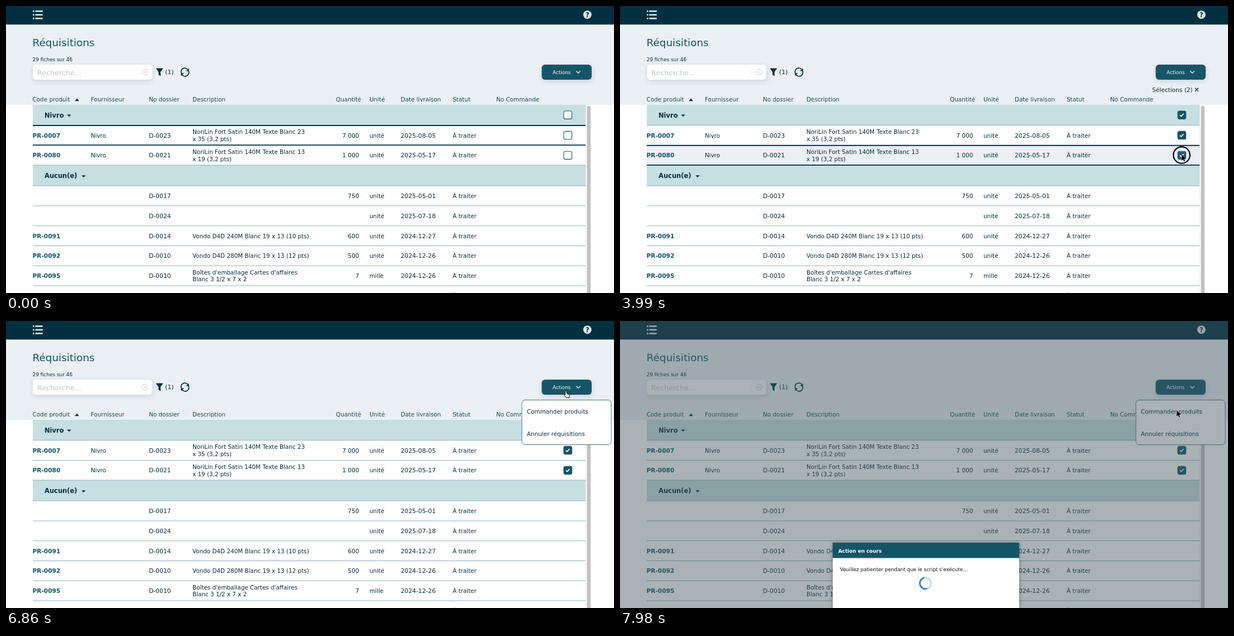
Animation of 1089x514 px, one loop 8000 ms. Source, as an HTML page:

```html
<!DOCTYPE html>
<html lang="fr">
<head>
<meta charset="utf-8">
<title>Réquisitions</title>
<style>
  html, body { margin: 0; width: 100%; height: 100%; overflow: hidden; background: #fff; }
  svg { display: block; width: 100vw; height: 100vh; font-family: "DejaVu Sans", sans-serif; }
  text { white-space: pre; }
</style>
</head>
<body>
<svg id="stage" viewBox="0 0 1089 514"></svg>
<script>
const LOOP = 8000, STEP = 70;
const DARK = '#00303f', TEAL = '#135567', PALE = '#ebf0f5', GROUP = '#c6dfe3', LINE = '#8fb2ba', INK = '#0b2d39';

const rect = (x, y, w, h, fill, extra = '') =>
  `<rect x="${x}" y="${y}" width="${w}" height="${h}" fill="${fill}" ${extra}/>`;
const path = (d, stroke, width = 1, extra = '') =>
  `<path d="${d}" fill="none" stroke="${stroke}" stroke-width="${width}" ${extra}/>`;
const shape = (d, fill = DARK) => `<path d="${d}" fill="${fill}"/>`;
const text = (x, y, s, size = 10.4, fill = INK, extra = '') =>
  `<text x="${x}" y="${y}" font-size="${size}" fill="${fill}" ${extra}>${s}</text>`;
const BOLD = 'font-weight="bold"';

// centre y, code, supplier, file, description lines, quantity, unit, date
const rows = [
  [231.7, 'PR-0007', 'Nivro', 'D-0023', ['NoriLin Fort Satin 140M Texte Blanc 23', 'x 35 (3,2 pts)'], '7 000', 'unité', '2025-08-05'],
  [267.5, 'PR-0080', 'Nivro', 'D-0021', ['NoriLin Fort Satin 140M Texte Blanc 13', 'x 19 (3,2 pts)'], '1 000', 'unité', '2025-05-17'],
  [340.3, '', '', 'D-0017', [], '750', 'unité', '2025-05-01'],
  [376, '', '', 'D-0024', [], '', 'unité', '2025-07-18'],
  [411.8, 'PR-0091', '', 'D-0014', ['Vondo D4D 240M Blanc 19 x 13 (10 pts)'], '600', 'unité', '2024-12-27'],
  [447.5, 'PR-0092', '', 'D-0010', ['Vondo D4D 280M Blanc 19 x 13 (12 pts)'], '500', 'unité', '2024-12-26'],
  [483.2, 'PR-0095', '', 'D-0010', ["Boîtes d'emballage Cartes d'affaires", 'Blanc 3 1/2 x 7 x 2'], '7', 'mille', '2024-12-26'],
  [519, '', '', '', [], '', '', '']
];

function rowText([cy, code, supplier, file, lines, qty, unit, date]) {
  const y = cy + 3.9;
  return text(47.5, y, code, 10.6, TEAL, BOLD) + text(152, y, supplier) + text(256, y, file, 10.7) +
    lines.map((s, i) => text(334, y + (i - (lines.length - 1) / 2) * 12.7, s)).join('') +
    text(632.5, y, qty, 10.6, INK, 'text-anchor="end"') + text(651, y, unit) +
    text(707, y, date, 10.8) + text(800, y, 'À traiter');
}

const columns = [[47.5, 'Code produit'], [152, 'Fournisseur'], [256, 'No dossier'], [334, 'Description'],
  [591, 'Quantité'], [651, 'Unité'], [707, 'Date livraison'], [800, 'Statut'], [878, 'No Commande']];

const header = rect(0, 0, 1089, 33.5, DARK) + rect(0, 33.5, 1089, 143.5, PALE) +
  [8, 14.5, 21].map(y => rect(48, y, 2.6, 2.6, '#d9eaec') + rect(52.4, y, 13.4, 2.6, '#d9eaec')).join('') +
  '<circle cx="1041.3" cy="15.6" r="7.4" fill="#dcebee"/>' +
  text(1041.3, 19.7, '?', 11.5, DARK, BOLD + ' text-anchor="middle"') +
  text(47.5, 72, 'Réquisitions', 18.4, TEAL) +
  text(47.5, 99.2, '29 fiches sur 46', 8.95) +
  rect(48, 105, 214, 27, '#fff', 'rx="6" filter="url(#soft)"') +
  text(56, 123.5, 'Recherche...', 12.75, '#c4c9cc') +
  path('M235.5 111V126', '#f3f5f6') +
  path('M254.2 118.5a5.2 5.2 0 1 1-10.4 0a5.2 5.2 0 1 1 10.4 0M246.8 116.3l4.4 4.4m0-4.4l-4.4 4.4', '#c4c9cc', .9) +
  shape('M268.5 111.5H281.5L276.8 118V125.5L273.2 123V118Z') +
  text(285, 122.3, '(1)', 11) +
  path('M314 120.5A6.7 6.7 0 0 1 325.5 113.8M327 116.5A6.7 6.7 0 0 1 315.5 123.2', DARK, 1.7) +
  shape('M327.6 111.6V116.8H322.4ZM313.4 125.4V120.2H318.6Z') +
  columns.map(([x, s]) => text(x, 171.3, s, 10.4, '#174b5a')).join('') +
  shape('M123.4 170.2H130.8L127.1 165.6Z');

const button = rect(959.5, 105, 89.5, 27, TEAL, 'rx="6" filter="url(#soft)"') +
  text(979, 121.5, 'Actions', 8.9, '#fff') + path('M1021.3 116.5l3.7 3.8l3.7-3.8', '#fff', 1.2);

const table = rect(48, 285, 990, 37, GROUP) +
  [249.5, 285, 322, 358, 393.7, 429.5, 465.2, 501].map(y => path(`M48 ${y}H1038`, LINE)).join('') +
  text(69, 308.4, 'Aucun(e)', 11.5, INK, BOLD) + shape('M135.3 303.2H142.7L139 307Z') +
  rows.map(rowText).join('') +
  rect(1038, 177, 1, 337, '#ececec') + rect(1040.5, 179, 6.5, 345, '#c1c1c1', 'rx="3.2"');

const menu = rect(924, 141.5, 160, 80, '#fff', 'rx="6" stroke="#4b7681"') +
  text(933, 166, 'Commander produits') + text(933, 206.3, 'Annuler réquisitions');

const dialog = rect(381, 397, 334, 130, '#fff', 'filter="url(#deep)"') + rect(381, 397, 334, 27.5, TEAL) +
  text(391, 415.3, 'Action en cours', 8.9, '#fff', BOLD) +
  text(394, 447.6, "Veuillez patienter pendant que le script s'exécute...", 8.9, '#111');

const defs = `<defs>
  <filter id="soft" x="-20%" y="-40%" width="140%" height="200%"><feDropShadow dx="1" dy="3" stdDeviation="4" flood-color="#345" flood-opacity=".16"/></filter>
  <filter id="deep" x="-20%" y="-40%" width="140%" height="180%"><feDropShadow dx="0" dy="1" stdDeviation="3" flood-color="#000" flood-opacity=".4"/></filter>
</defs>`;

// time, x, y of the pointer tip
const track = [
  [490, 718, 419], [560, 820, 362], [630, 896, 318], [700, 896, 318], [840, 945, 268], [980, 976, 241],
  [1050, 976, 241], [1190, 983, 244], [1330, 997, 236], [1470, 1018, 212], [1680, 1005, 239],
  [2380, 1005, 239], [2800, 1008, 269], [3150, 1006, 266], [4410, 1006, 266], [4760, 1005, 251],
  [5250, 1008, 214], [5530, 1010, 201], [5880, 1010, 201], [5950, 1016, 174], [6300, 1004, 118],
  [6790, 1004, 118], [7210, 997, 158.5], [7630, 997, 158.5], [7980, 997, 160]
];
// start, duration of each click ring
const clicks = [[2030, 210], [3990, 210], [6440, 70], [7560, 70]];

function pointerAt(t) {
  const i = track.findIndex(p => p[0] > t);
  if (i < 0) return track[track.length - 1].slice(1);
  const [a, b] = [track[i - 1], track[i]], k = (t - a[0]) / (b[0] - a[0]);
  return [a[1] + (b[1] - a[1]) * k, a[2] + (b[2] - a[2]) * k];
}

function pointer(t) {
  if (t < track[0][0]) return '';
  const [x, y] = pointerAt(t);
  const click = clicks.find(([start, len]) => t >= start && t < start + len);
  const ring = click ? `<circle cx="${x}" cy="${y + 1}" r="14.8" fill="none" stroke="#000" stroke-width="2.2" opacity="${1 - (t - click[0]) / click[1]}"/>` : '';
  const hand = t >= 5670 && t < 7000;
  const icon = hand
    ? '<path transform="translate(-4 0)" d="M3 7.6V1.5a1.2 1.2 0 0 1 2.4 0V4.8l3.7.8q1.6.4 1.4 2L9.8 12.5H4.6L.8 8.4Q.9 6.6 3 7.6M7.2 5.4v2M8.9 5.8v2" fill="#fff" stroke="#111" stroke-width="1"/>'
    : '<path d="M0 0V10.8L2.5 8.5L4.2 12.3L6 11.5L4.3 7.8H7.8Z" fill="#000" stroke="#fff" stroke-width=".8" paint-order="stroke"/>';
  return ring + `<g transform="translate(${x} ${y})">${icon}</g>`;
}

const checkbox = (cy, on, opacity = 1) =>
  rect(999, cy - 7.2, 14.6, 14.4, on ? TEAL : '#fff', `rx="3" stroke="#1d5666" stroke-width="1.1" opacity="${opacity}"`) +
  (on ? path(`M1002.8 ${cy}l2.3 2.3l4.5-4.6`, '#fff', 1.6) : '');

function selection(n) {
  if (!n) return '';
  const x = n > 1 ? 953 : 956, close = n > 1 ? 1033 : 1031;
  return text(x, 153.6, n > 1 ? 'Sélections (2)' : 'Sélection (1)', 10.6) +
    path(`M${close - 3} 146.7l6 6m0-6l-6 6`, INK, 1.3);
}

function hoveredRow(t) {
  return t < 2870 ? 1 : t < 4830 ? 2 : t < 5320 ? 1 : t < 6020 ? 0 : -1;
}

function groupHead(hover, on) {
  const dim = hover ? .78 : 1;
  return rect(48, 177, 990, 36.5, hover ? '#d2e4e8' : GROUP) + path('M48 213.5H1038', LINE) +
    `<g opacity="${dim}">${text(69, 199.6, 'Nivro', 11.5, INK, BOLD)}${shape('M109.3 194.4H116.7L113 198.2Z')}</g>` +
    checkbox(195.2, on, dim);
}

function spinner(t) {
  const ring = (color, extra = '') => `<circle cx="547" cy="469.7" r="10" fill="none" stroke="${color}" stroke-width="2.6" ${extra}/>`;
  const angle = 75 + (t - 7980) * .36;
  return ring('#b7d7f3') + ring('#1a7fe6', `pathLength="100" stroke-dasharray="52 48" transform="rotate(${angle} 547 469.7)"`);
}

function scene(t) {
  const checked = [t >= 2030, t >= 3990];
  const hover = hoveredRow(t);
  const fill = hover > 0 && checked[hover - 1] ? rect(48, 178 + hover * 35.8, 990, 35.5, PALE) : '';
  const edge = hover > 0 ? [178.2, 213.3].map(y => path(`M48 ${y + hover * 35.8}H1038`, DARK, 1.9)).join('') : '';
  const veil = t < 7560 ? 0 : t < 7630 ? .22 : .45;
  return defs + header + button + selection(checked[0] + checked[1]) +
    groupHead(hover === 0, checked[1]) + fill + table + edge +
    checked.map((on, i) => checkbox(231.6 + i * 35.8, on, on && hover === i + 1 ? .93 : 1)).join('') +
    (t >= 6440 ? menu : '') +
    (veil ? rect(0, 0, 1089, 514, '#40545c', `opacity="${veil}"`) : '') +
    (t >= 7630 ? dialog + spinner(t) : '') + pointer(t);
}

const stage = document.getElementById('stage');
let shown = -1;
function tick() {
  const t = Math.floor(performance.now() % LOOP / STEP) * STEP;
  if (t !== shown) stage.innerHTML = scene(shown = t);
  requestAnimationFrame(tick);
}
tick();
</script>
</body>
</html>
```
